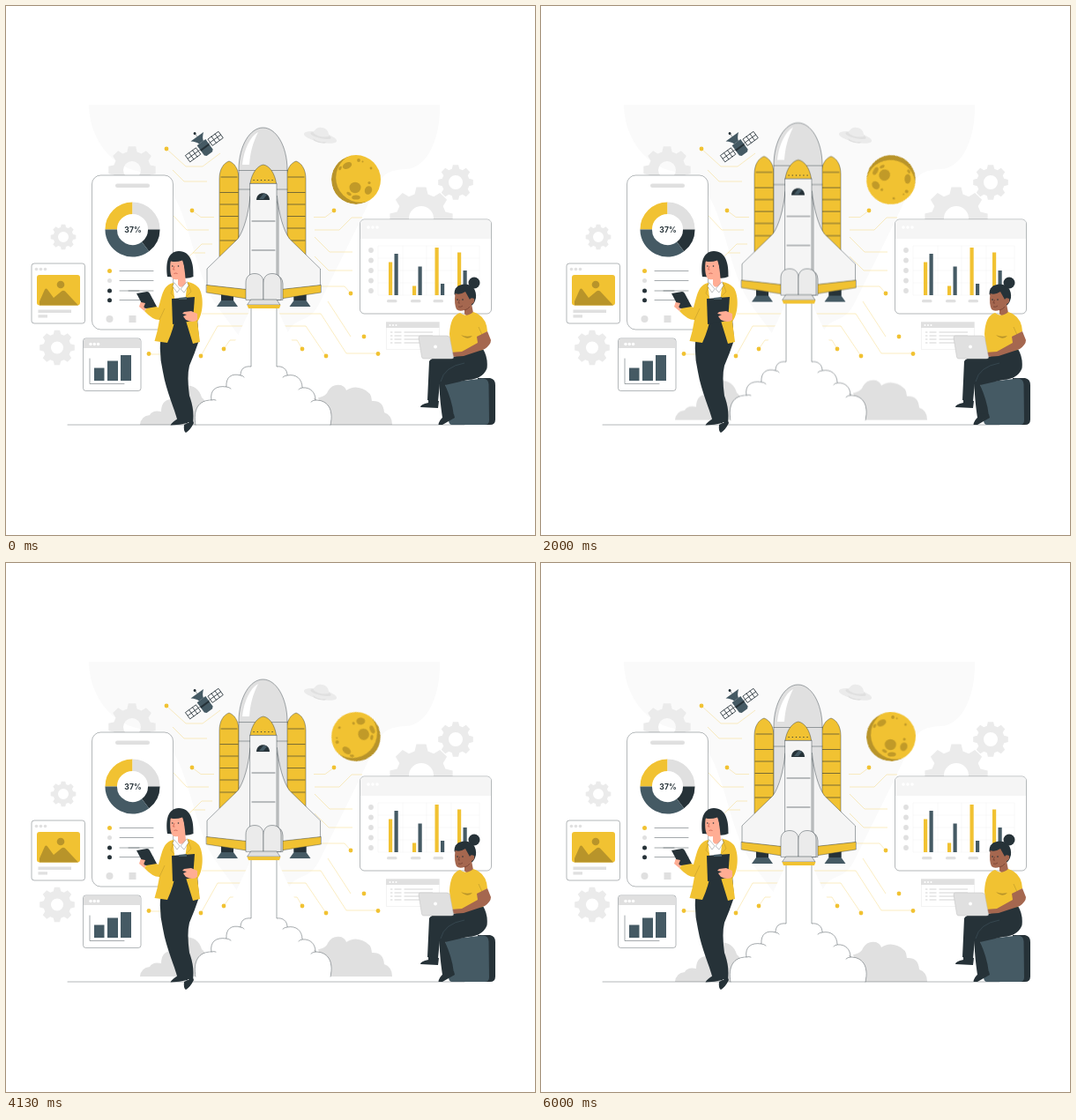
Recreate the animation shown at these times as an HTML page. Size 600 by 600 pixels, loop 6040 ms.

```html
<!DOCTYPE html>
<html lang="en">
<head>
<meta charset="utf-8">
<title>Rocket launch</title>
<style>
  html, body { margin: 0; width: 100%; height: 100%; overflow: hidden; background: #fff; }
  svg { display: block; width: 100vw; height: 100vh; }
  .y { fill: #f1c232; } .y2 { fill: #b8942a; }
  .d { fill: #263238; } .s { fill: #455a64; }
  .g { fill: #e0e0e0; } .l { fill: #ebebeb; } .p { fill: #f5f5f5; } .w { fill: #fff; }
  .skin { fill: #ffad94; } .brown { fill: #a5674f; }
  .o { stroke: #263238; stroke-width: .42; stroke-linejoin: round; stroke-linecap: round; }
  .card { fill: #fff; stroke: #263238; stroke-width: .35; }
  .n { fill: none; }
  .wire { fill: none; stroke: #f1c232; stroke-width: .5; opacity: .6; }
  text { font: 700 8.6px Inter, "Open Sans", sans-serif; fill: #263238; text-anchor: middle; }
</style>
</head>
<body>
<svg viewBox="0 0 600 600">
  <defs>
    <clipPath id="disc"><circle r="28"/></clipPath>
    <g id="booster">
      <path class="y o" d="M242 284V196C242 185 247 178 253 176C259 178 264 185 264 196V284Z"/>
      <path class="o n" style="stroke-width:.6" d="M244 194H262M243 211.500H263M243 225H263M243 238.500H263M243 252H263M243 266H263"/>
    </g>
    <g id="wing">
      <path class="p o" d="M277 216C275 236 270 254 263 264L228 298V317L273 322H292V216Z"/>
      <path class="s" d="M244 327L258 329V334L263 341H239L244 334Z"/>
      <path class="d" d="M244 327L258 329V334H244Z"/>
      <path class="y o" d="M227.500 316.500L273 321.500V332L227.500 325Z"/>
    </g>
    <path id="pod" class="l o" d="M272 333V314C272 307 276 303.500 282 303.500S292 307 292 314V333Z"/>
  </defs>

  <path fill="#fafafa" d="M94 112H492C493 150 478 184 454 185C434 186 428 190 420 205C400 248 374 300 354 340C342 362 326 350 318 375C312 402 286 404 276 392C256 360 244 350 230 325C204 270 205 196 152 188C112 180 94 142 94 112Z"/>
  <g id="gears"></g>

  <!-- flying saucer -->
  <g transform="translate(357 147) rotate(13)">
    <ellipse class="l" rx="19" ry="5.500" cy="2"/>
    <ellipse class="g" rx="12" ry="3" cy="0"/>
    <path class="l" d="M-9 -1C-8 -12 8 -12 9 -1Q0 3 -9 -1Z"/>
    <path class="g" d="M-8 5Q0 9 8 5L6 7.500Q0 9 -6 7.500Z"/>
  </g>

  <!-- satellite -->
  <g transform="translate(225 159.500) rotate(-36)">
    <path class="o" d="M-18 0H18"/>
    <g class="w o" style="stroke-width:.8">
      <path id="panel" d="M8.500-4.500H23V4.500H8.500ZM8.500 0H23M13.300-4.500V4.500M18.200-4.500V4.500"/>
      <use href="#panel" x="-31.500"/>
    </g>
    <path class="s" d="M-6-6H6V8L4 10H-4L-6 8Z"/>
    <path class="d" d="M-6 0H6V2H-6Z"/>
    <path class="s" d="M-9-14H9Q4-10 3-6H-3Q-4-10-9-14Z"/>
    <path class="o" d="M0-14V-18"/><circle class="d" cy="-18.500" r="1.500"/>
  </g>

  <g id="wires"></g>

  <!-- planet -->
  <g transform="translate(397 197)">
    <g id="planet" clip-path="url(#disc)">
      <circle class="y2" r="28"/>
      <circle class="y" r="28" cx="5.200" cy="-2.200"/>
      <g id="craters" fill="#c19a28"></g>
    </g>
  </g>

  <!-- rocket with smoke -->
  <g id="rocket">
    <path class="g" d="M152 475Q153 465 163 464Q166 458 176 460Q176 447 187 446Q189 430 203 430Q218 430 222 444Q232 452 232 475Z"/>
    <path class="g" d="M340 475V445Q362 446 365 437Q370 428 380 430Q385 432 386 436Q394 430 404 434Q415 438 415 448Q428 447 429 461Q438 464 438 475Z"/>
    <path class="w" d="M277 341H307V420H277Z"/>
    <path class="w o" d="M215 475C212 458 218 447 233 447C231 436 238 430 250 432C249 421 256 416 266 419C266 412 270 408 278 409V342M307 342V409C314 408 319 412 319 419C329 417 336 423 336 433C345 432 351 438 351 447C364 447 372 456 368 475"/>
    <path class="w" d="M215.500 475C214 458 219 448 233 447.500L250 432L266 419L279 409H306L319 419L336 433L351 447.500C364 448 371 457 367.500 475Z"/>
    <path class="o n" d="M233 447Q236 446 238 447M250 432Q253 432 255 434M266 419Q269 419 270 421M319 419Q316 419 314 421M336 433Q333 433 332 435M351 447Q348 447 346 449"/>

    <use href="#booster"/><use href="#booster" x="76"/>
    <path class="g o" d="M264 270V186C264 158 277 138 291.500 138S319 158 319 186V270Z"/>
    <path class="w" d="M268 180C270 162 277 148 286 143C280 155 277 166 276 180Z"/>
    <path class="o n" d="M264 186.500H319M264 208H319"/>
    <use href="#wing"/>
    <use href="#wing" transform="matrix(-1 0 0 1 584.500 0)"/>
    <path class="g o" d="M305 214Q309 222 309 240V310H305Z"/>
    <path class="p o" d="M277 201H307V322H277Z"/>
    <path class="y o" d="M277 201C278.500 190 285 181 291.800 180C299 181 305 190 306.500 201Z"/>
    <path class="o n" stroke-dasharray=".2 4" style="stroke-width:1.200" d="M281 197.500H304"/>
    <path class="d" d="M284 220C284 209.500 299 209.500 299 220Z"/>
    <path class="s" d="M287 219L292 213Q295 213 296 214L292 219Z"/>
    <path class="o n" style="stroke-width:.6" d="M279 244H305M279 277H305"/>
    <path class="g o" d="M305 333V305Q313.500 306 314 315V333Z"/>
    <use href="#pod"/><use href="#pod" x="20"/>
    <path class="g o" d="M278 333H307L311 339H274Z"/>
    <path class="y" d="M273.500 339H311.500L310 343H275Z"/>
  </g>

  <path class="o" style="stroke-width:.35" d="M70 475H520"/>

  <!-- phone -->
  <rect class="card" x="97.500" y="192" width="92" height="175" rx="10"/>
  <rect class="g" x="124" y="201.500" width="39" height="4.500" rx="2.200"/>
  <g id="donut" fill="none" stroke-width="13.500" transform="translate(143.500 253.500)"></g>
  <text x="144" y="257">37%</text>
  <circle class="y" cx="117.500" cy="300.500" r="2.500"/>
  <circle class="g" cx="117.500" cy="311.500" r="2.500"/>
  <circle class="d" cx="117.500" cy="323" r="2.500"/>
  <circle class="d" cx="117.500" cy="333.800" r="2.500"/>
  <path class="o" d="M129 300.500H167M129 311.500H167M129 323H167M129 333.500H167"/>
  <circle class="g" cx="117.500" cy="355" r="4"/>
  <path class="g" d="M139.500 351H147.500V359H139.500Z"/>

  <!-- picture card -->
  <rect class="card" x="29" y="292" width="60.500" height="68" rx="3"/>
  <g id="dots"></g>
  <rect class="y" x="35" y="305" width="49" height="34.500" rx="3"/>
  <g class="y2">
    <circle cx="62" cy="316" r="4.300"/>
    <path d="M38 339.500V335L44 321.500Q45.500 319.500 47 321.500L54 331L63 323.500Q65 322 67 323.500L82 339.500Z"/>
  </g>
  <path class="g" d="M36.500 344.500H74V348H36.500ZM36.500 350.200H47V353.500H36.500Z"/>

  <!-- bar card -->
  <rect class="card" x="87.500" y="377" width="65.500" height="59.500" rx="3"/>
  <path class="g" d="M88 388V380Q88 377.500 91 377.500H150Q152.700 377.500 152.700 380V388Z"/>
  <path class="o n" d="M95 400V428.500H134"/>
  <path class="s" d="M100 410.500H111.500V425H100ZM115 402.500H127V425H115ZM130 396H142V425H130Z"/>

  <!-- chart window -->
  <rect class="card" x="401.500" y="242" width="149" height="107" rx="5"/>
  <path class="p" d="M402 264V247Q402 242.500 407 242.500H545Q550 242.500 550 247V264Z"/>
  <path stroke="#f0f0f0" stroke-width=".5" d="M422 272H537M422 286H537M422 300H537M422 314H537M422 328H537M422 272V328M450 272V328M477 272V328M505 272V328M537 272V328"/>
  <g id="chart"></g>

  <!-- text card -->
  <rect fill="#fff" stroke="#ebebeb" stroke-width=".6" x="431.500" y="358.500" width="60" height="31"/>
  <path class="g" d="M431 358.500H491.500V365H431Z"/>
  <path stroke="#d4d4d4" stroke-width="1" stroke-dasharray="2.500 2 8 3 34" d="M436 370H484M436 374H484M436 378H484M436 382H484"/>

  <g id="windowDots"></g>

  <!-- standing woman -->
  <path class="d" d="M180 355H217L219 379Q214 394 208 408Q205 420 208 442Q214 458 212 472H195C191 456 182 438 178 415Q174 398 175 382Z"/>
  <path class="d" d="M195 468H206V473Q197 475 186.500 475.500Q188 472 195 468ZM202 475L212 470L213 473Q209 481 204 484Q201 482 202 475Z"/>
  <path class="d" d="M183 307C181 292 183 278.500 196 278C210 278 213 293 212.500 307Q206 310 199 308Z"/>
  <path class="w" d="M190 314L206 313L208 350H192Z"/>
  <path class="skin" d="M187 287C185.500 297 186 305 189 309Q191 311 195 310V316Q198 322 204 315L203 303L201 288Z"/>
  <path class="d" d="M184.500 292Q186 280 196 279Q208 281 207.500 297L204 303Q202 293 200 288.500Q193 291 187 289.500Z"/>
  <g class="d"><circle cx="188.800" cy="295" r=".8"/><circle cx="195.500" cy="295" r=".8"/></g>
  <path class="n" stroke="#c95f4e" stroke-width=".8" d="M191 295L189.500 299H191.500M190.500 303.500Q192.500 302.500 194.500 303.500"/>
  <path class="y" d="M190 314C178 316 177 329 173 342L163 338L157 346Q166 356 174 356Q172 369 168.500 380L183 382Q190 367 193 349L190 322Z"/>
  <path class="y" d="M206 313L203 335L204 357L212 383L220 381L217 358C225 348 224 325 218 319Q213 314 206 313Z"/>
  <path class="n" stroke="#b8942a" stroke-width=".5" d="M174 356L180 343M217 358L213 350M190 316L187 326L191 330M207 316L210 324L205 329"/>
  <path class="w o" style="stroke-width:.3" d="M191 314L197 321L194 325L189 318ZM205 313L198 321L202 325L207 317Z"/>
  <path class="d" d="M188 332L214 330L212 357L189 361Z"/>
  <path class="s" d="M196 331L205 330V333H196Z"/>
  <path class="skin" d="M217 349L210 346L202 347L200 349L205 350L201 352L204 356Q212 360 217 356Z"/>
  <path class="skin" d="M163 337L158 333L153 335L151 341L157 346Z"/>
  <path class="d" d="M148 326L160 324Q162 324 163 326L171 341L159 343Q157 343 156 341Z"/>
  <path class="skin" d="M153 336L158 337L156 342L152 341Z"/>
  <path class="o" d="M139 323H151"/>

  <!-- seated woman -->
  <path class="d" d="M535 422H549Q555 423 555 430V469Q555 475 549 475H535Z"/>
  <path class="s" d="M498 431Q498 428 502 427L540 422.500Q547 422 547.500 429L548 470Q548 475 543 475H506Q502 475 502 469Z"/>
  <path class="d" d="M507 398L541 389Q547 399 545.500 411Q541 423 524 424L498 430Q506 447 508 465L495 467Q491 440 492 428L490 449L478 447L480 403Q482 399 490 399Z"/>
  <path class="d" d="M479 446L491 448L490 456L470 455Q470 452 479 450ZM496 462L508 463L509 467L495 475L490.500 475Q491 470 496 466Z"/>
  <path class="n" stroke="#455a64" stroke-width=".5" d="M493 426Q497 409 520 405"/>
  <circle class="d" cx="531" cy="314" r="6.500"/>
  <path class="d" d="M508.500 327Q508 316 521 315.500Q534 317 533 331Q531 340 525 341Z"/>
  <path class="brown" d="M509.500 326Q508 338 511 344Q514 347 520 345V349Q523 354 530 348L528 338Q532 337 531 332Q527 330 526 333L521 324Q515 328 509.500 326Z"/>
  <g class="d"><circle cx="512" cy="333" r=".8"/><circle cx="518" cy="333" r=".8"/></g>
  <path class="n" stroke="#6d3c2e" stroke-width=".7" d="M514.500 333L513 337H515M513 341Q516 342 518 340M520 345Q524 344 526 341"/>
  <path class="y" d="M515 348Q504 351 503 372L505 394L541 390Q543 383 540 373L546 369Q545 352 530 347Q522 354 515 348Z"/>
  <path class="y2" d="M516 373Q521 376 529 374Q524 380 516 373Z"/>
  <path class="n" stroke="#b8942a" stroke-width=".6" d="M540 373L536 364"/>
  <path class="brown" d="M546 369L550 379Q550 384 543 389L519 397L505 398L504 393L517 392L535 382L534 375Z"/>
  <path class="g" stroke="#bdbdbd" stroke-width=".5" d="M470 374H500Q503 374 503.500 377L507.500 398Q508 400 505 400H474Q472 400 471.500 398L468 376Q468 374 470 374Z"/>
  <circle class="w" cx="487" cy="386.500" r="1.900"/>
</svg>

<script>
const $ = id => document.getElementById(id);
const add = (id, markup) => { $(id).innerHTML += markup; };
const dot = (x, y, r, cls) => `<circle class="${cls}" cx="${x}" cy="${y}" r="${r}"/>`;

// Gears: centre, outer radius, hole radius
function gear(x, y, r, hole) {
  const teeth = 8, step = Math.PI * 2 / teeth, inner = r * .79;
  const pts = [];
  for (let i = 0; i < teeth; i++) {
    for (const [a, k] of [[-.34, inner], [-.2, r], [.2, r], [.34, inner]]) {
      const t = (i + a) * step;
      pts.push(`${(x + k * Math.cos(t)).toFixed(1)} ${(y + k * Math.sin(t)).toFixed(1)}`);
    }
  }
  const ring = `M${x - hole} ${y}a${hole} ${hole} 0 1 0 ${2 * hole} 0a${hole} ${hole} 0 1 0 ${-2 * hole} 0Z`;
  return `<path class="l" fill-rule="evenodd" d="M${pts.join('L')}Z${ring}"/>`;
}
add('gears', [[143, 186, 27, 10], [65, 262, 14.5, 6], [58, 387.5, 20, 7],
  [471, 241, 36, 14], [510, 200, 20, 8]].map(g => gear(...g)).join(''));

// Circuit traces and their end points
const wires = [
  'M182 162L204 182H223L243 167', 'M189 186L202 199H228', 'M211 232L221 239.500H236',
  'M190 238L205 254H230', 'M212 280L222 270H234', 'M190 300L212 280H226',
  'M372 232L362 239.500H349', 'M404 240H392L378 254H350', 'M350 262L367 279H393',
  'M350 284L366 300H393', 'M391 326L384 318H357', 'M365 335L391 375',
  'M308 349H357L386 394H422', 'M336 389L330 379H318', 'M363 397L340 363H308',
  'M247 389L254 379H268', 'M221 397L240 363H277', 'M222 349H277', 'M162 395H180'
];
const ends = [[182, 162], [211, 232], [372, 232], [391, 326], [406, 375], [422, 394.5],
  [336, 389], [363, 397], [247, 389], [221, 397], [162, 394.5]];
add('wires', wires.map(d => `<path class="wire" d="${d}"/>`).join('') +
  ends.map(([x, y]) => dot(x, y, 2.4, 'y')).join(''));

// Craters: x, y, rx, ry, tilt
add('craters', [[-10, -16, 5.5, 3.5, -25], [-1, 9, 6.5, 6.2, 0], [14, 12, 4, 5, 25], [0, 20, 4.8, 2.6, 0],
  [-8, 16, 3, 1.6, 30], [3, -22, 1.9, 1.9, 0], [7.5, -20.5, 1, 1, 0], [17, -13, 1.4, 1.4, 0],
  [15, 3.5, 1.6, 1.6, 0], [-18, -13, 1.5, 2.5, 30]]
  .map(([x, y, a, b, r]) => `<ellipse rx="${a}" ry="${b}" transform="translate(${x} ${y}) rotate(${r})"/>`).join(''));

// Donut slices in degrees
const at = deg => [Math.cos(deg * Math.PI / 180) * 24.3, Math.sin(deg * Math.PI / 180) * 24.3].join(' ');
add('donut', [[-180, -90, '#f1c232'], [-90, 0, '#e0e0e0'], [0, 53, '#263238'], [53, 180, '#455a64']]
  .map(([a, b, c]) => `<path stroke="${c}" d="M${at(a)}A24.3 24.3 0 0 1 ${at(b)}"/>`).join(''));

// Window buttons
const trio = (x, y, gap, r, cls) => [0, 1, 2].map(i => dot(x + i * gap, y, r, cls)).join('');
add('dots', trio(34.5, 298.5, 5, 1.8, 'g'));
add('windowDots', trio(96, 383.5, 4.3, 1.7, 'w') + trio(411, 251, 5, 1.8, 'w') + trio(435.5, 362, 3.5, 1, 'w'));

// Chart: x, top of the yellow bar, top of the dark bar
const bar = (x, top, cls) => `<rect class="${cls}" x="${x}" y="${top}" width="4.2" height="${328 - top}"/>`;
add('chart', [[434, 290.5, 281], [461, 317.5, 295.5], [486.5, 274, 315], [512, 279.5, 300]]
  .map(([x, a, b]) => bar(x, a, 'y') + bar(x + 6.5, b, 's') +
    `<rect class="g" x="${x - 2}" y="333" width="11.5" height="3.2" rx="1.5"/>`).join('') +
  [0, 1, 2, 3, 4].map(i => dot(414, 277 + i * 11.5, 2.9, 'g')).join(''));

// Motion
const loop = 6040;
$('planet').animate([{ transform: 'rotate(0deg)' }, { transform: 'rotate(360deg)' }],
  { duration: loop, iterations: Infinity });
$('rocket').animate(['0px', '-7px', '0px'].map(y => ({ transform: `translateY(${y})`, easing: 'ease-in-out' })),
  { duration: loop / 2, iterations: Infinity });
</script>
</body>
</html>
```
